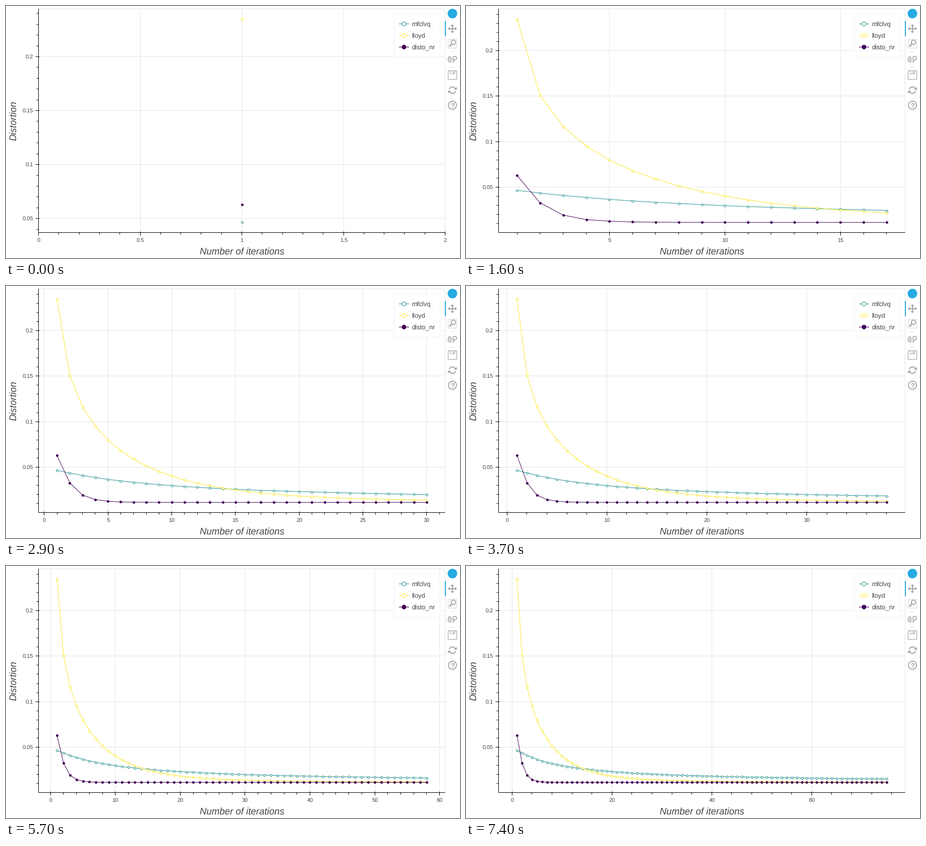
Recreate the animation shown at these times as a matplotlib script. Size 900 px wide and 500 px high, loop 7500 ms.

```python
import numpy as np
import matplotlib.pyplot as plt
from matplotlib.animation import FuncAnimation
from matplotlib.collections import LineCollection
from matplotlib.patches import Arc, Circle, Ellipse, Polygon, Rectangle

W, H, DPI = 900, 500, 100
PX = 72 / DPI                       # points per pixel
LEFT, RIGHT, TOP, BOTTOM = 64.5, 870.5, 5.5, 449.5
COUNT = 75
GRID, TEXT, ICON = "#e5e5e5", "#444444", "#a1a6a9"
TEAL, YELLOW, PURPLE = "#208f8c", "#fde724", "#440154"

plt.rcParams["font.family"] = "Liberation Sans"
plt.rcParams["text.hinting"] = "none"

steps = np.arange(1, COUNT + 1)


def curve(floor, at, values):
    """Decay towards a floor, geometric between a few points."""
    logs = np.log(np.array(values) - floor)
    return floor + np.exp(np.interp(np.log(steps), np.log(at), logs))


mfclvq = curve(
    0, [1, 2, 3, 4, 5, 6, 8, 10, 13, 17, 20, 25, 30, 38, 50, 65, 75],
    [.0465, .0434, .0408, .0386, .0365, .0348, .0320, .0296, .0270, .0244,
     .0231, .0212, .0198, .0183, .0168, .0155, .0150])
lloyd = curve(
    .0112, [*range(1, 18), 20, 25, 30, 38, 50, 75],
    [.2349, .1510, .1164, .0951, .0797, .0681, .0588, .0513, .0452, .0402,
     .0358, .0323, .0294, .0269, .0249, .0231, .0215, .0181, .0152, .0137,
     .0125, .0118, .0114])
disto_nr = curve(
    .0112, [1, 2, 3, 4, 5, 6, 7, 8, 12],
    [.0628, .0327, .0192, .0143, .0125, .0117, .0114, .0113, .01121])

SERIES = [("mfclvq", mfclvq, TEAL, "white"),
          ("lloyd", lloyd, YELLOW, "white"),
          ("disto_nr", disto_nr, PURPLE, PURPLE)]

fig = plt.figure(figsize=(W / DPI, H / DPI), dpi=DPI, facecolor="white")
ax = fig.add_axes([0, 0, 1, 1])
ax.set(xlim=(0, W), ylim=(H, 0))
ax.axis("off")


def label(x, y, s, size, **kw):
    kw = {"color": TEXT, "ha": "center", "va": "baseline", **kw}
    return ax.text(x, y, s, fontsize=size * PX, **kw)


def stroke(xs, ys, color, width=1, **kw):
    kw = {"solid_capstyle": "butt", "snap": False, **kw}
    return ax.plot(xs, ys, color=color, lw=width * PX, **kw)[0]


def shape(patch, fill="none", edge="none", width=1, **kw):
    patch.set(facecolor=fill, edgecolor=edge, linewidth=width * PX,
              snap=False, **kw)
    return ax.add_patch(patch)


def segments(color, z):
    lines = LineCollection([], colors=color, linewidths=PX, zorder=z)
    lines.set_snap(False)
    return ax.add_collection(lines, autolim=False)


def draw_legend():
    shape(Rectangle((769.5, 15.5), 91, 86), "white", alpha=.95, zorder=5)
    shape(Rectangle((769.5, 15.5), 91, 86), edge=GRID, alpha=.5, zorder=5)
    for i, (name, _, color, fill) in enumerate(SERIES):
        y = 35.5 + 23 * i
        stroke([779, 799], [y, y], color, zorder=6)
        shape(Circle((789, y), 4), fill, color, zorder=7)
        label(804, y + 4.5, name, 13, ha="left", zorder=7)


def draw_lens(x, y, r, hx, hy, width):
    shape(Circle((x, y), r), edge=ICON, width=1.8)
    d = np.hypot(hx - x, hy - y)
    stroke([x + (hx - x) * r / d, hx], [y + (hy - y) * r / d, hy], ICON, width)


def draw_toolbar():
    shape(Circle((885, 15), 9.5), "#26aae1")
    shape(Rectangle((870, 30), 2, 30), "#26aae1", zorder=6)

    # pan
    stroke([879, 891], [45, 45], ICON, 2)
    stroke([885, 885], [39, 51], ICON, 2)
    for dx, dy in [(1, 0), (-1, 0), (0, 1), (0, -1)]:
        shape(Polygon([(885 + 9 * dx, 45 + 9 * dy),
                       (885 + 5 * dx + 3.5 * dy, 45 + 5 * dy + 3.5 * dx),
                       (885 + 5 * dx - 3.5 * dy, 45 + 5 * dy - 3.5 * dx)]),
              ICON)

    # box zoom
    shape(Rectangle((876.5, 66.5), 17, 17), edge=ICON, linestyle=(0, (2, 2)))
    shape(Circle((887, 72), 5), "white")
    draw_lens(887, 72, 4.3, 879, 80.5, 2.8)

    # wheel zoom
    shape(Ellipse((879.5, 106), 6, 11), edge=ICON, width=1.6)
    stroke([879.5, 879.5], [103.5, 108], ICON, 1.5)
    draw_lens(889.5, 103.5, 3.7, 885.5, 112, 2)

    for y in (90.5, 121.5):
        stroke([880, 890], [y, y], GRID)

    # save
    shape(Rectangle((876.5, 128.5), 17, 17), edge=ICON, width=1.2)
    shape(Rectangle((880.5, 128.5), 9, 6), edge=ICON)
    shape(Rectangle((886, 130), 2, 3.5), ICON)

    # reset
    for a in (0, 180):
        shape(Arc((885, 167), 13, 13, theta1=a + 15, theta2=a + 155),
              edge=ICON, width=2)
    shape(Polygon([(876, 168), (882, 168), (876.5, 173.5)]), ICON)
    shape(Polygon([(894, 166), (888, 166), (893.5, 160.5)]), ICON)

    # help
    shape(Circle((885, 197), 8), edge=ICON, width=1.8)
    label(885, 201.6, "?", 13, color=ICON, weight="bold")


def padded(low, high):
    if low == high:
        return low - 1, high + 1
    pad = .05 * (high - low)
    return low - pad, high + pad


def tick_step(span):
    """Interval of 1, 2 or 5 times a power of ten nearest to six ticks."""
    unit = 10.0 ** np.floor(np.log10(span / 6))
    return min((m * unit for m in (.5, 1, 2, 5, 10)),
               key=lambda s: abs(6 - span / s))


def ticks(low, high):
    step = tick_step(high - low)

    def inside(gap):
        ks = np.arange(np.floor(low / gap), np.ceil(high / gap) + 1)
        ts = np.round(ks * gap, 8) + 0.0
        return ts[(ts >= low - 1e-9) & (ts <= high + 1e-9)]
    return inside(step), inside(step / 5)


def crisp(v):
    return np.floor(v + 1e-6) + .5


grid = segments(GRID, 1)
marks = segments("black", 3)
shape(Rectangle((LEFT, TOP), RIGHT - LEFT, BOTTOM - TOP), edge=GRID, zorder=1)
stroke([LEFT, LEFT], [TOP, BOTTOM], "black", zorder=3)
stroke([LEFT, RIGHT], [BOTTOM, BOTTOM], "black", zorder=3)
plots = [stroke([], [], color, marker="o", ms=4 * PX, mec=color, mfc=fill,
                mew=PX, zorder=2, solid_joinstyle="round")
         for _, _, color, fill in SERIES]
label(467.5, 493, "Number of iterations", 56 / 3, style="italic")
label(20, 227.5, "Distortion", 56 / 3, style="italic", rotation=90,
      rotation_mode="anchor")
draw_legend()
draw_toolbar()
tick_labels = []


def update(i):
    n = i + 1
    shown = [values[:n] for _, values, _, _ in SERIES]
    x0, x1 = padded(1, n)
    y0, y1 = padded(np.min(shown), np.max(shown))

    def sx(v):
        return LEFT + (v - x0) / (x1 - x0) * (RIGHT - LEFT)

    def sy(v):
        return BOTTOM - (v - y0) / (y1 - y0) * (BOTTOM - TOP)

    for line, values in zip(plots, shown):
        line.set_data(sx(steps[:n]), sy(values))

    while tick_labels:
        tick_labels.pop().remove()
    rules, dashes = [], []

    major, minor = ticks(x0, x1)
    for t in major:
        x = crisp(sx(t))
        rules.append([(x, TOP), (x, BOTTOM)])
        dashes.append([(x, BOTTOM - 2), (x, BOTTOM + 6)])
        tick_labels.append(label(x, 468, f"{t:g}", 11))
    dashes += [[(x, BOTTOM), (x, BOTTOM + 4)] for x in crisp(sx(minor))]

    major, minor = ticks(y0, y1)
    for t in major:
        y = crisp(sy(t))
        rules.append([(LEFT, y), (RIGHT, y)])
        dashes.append([(LEFT - 6, y), (LEFT + 2, y)])
        tick_labels.append(label(54, y + 3.5, f"{t:g}", 11, ha="right"))
    dashes += [[(LEFT - 4, y), (LEFT, y)] for y in crisp(sy(minor))]

    grid.set_segments(rules)
    marks.set_segments(dashes)
    return [*plots, grid, marks, *tick_labels]


anim = FuncAnimation(fig, update, frames=COUNT, interval=100, repeat=True,
                     repeat_delay=0, blit=False)
plt.show()
```
